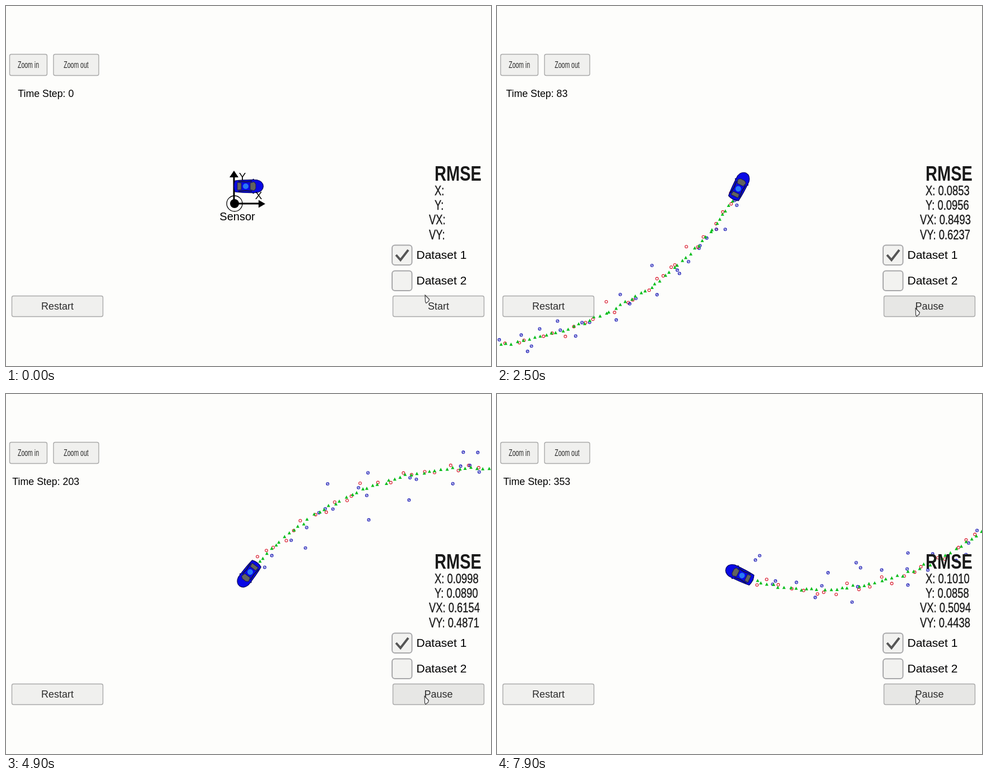
Write an HTML page with a canvas that moves like this. It is 868 px wide and 645 px high and loops after 8000 ms.

```html
<!DOCTYPE html>
<html lang="en">
<head>
<meta charset="utf-8">
<title>Sensor fusion tracker</title>
<style>
html, body { margin: 0; width: 100%; height: 100%; overflow: hidden; background: #fdfdfb; }
canvas { display: block; }
</style>
</head>
<body>
<canvas id="view" width="868" height="645"></canvas>
<script>
const ctx = document.getElementById('view').getContext('2d');
const LOOP = 8000, FRAME = 100, LAST = 353;
const FACE = '"Liberation Sans", Arial, sans-serif';
const CAR = { x: 434, y: 323 };

// Car position relative to the sensor every 25 steps, from step -25
const GAP = 25;
const PATH = [
  [-240, -39], [25, -31], [295, -39], [547, -107], [746, -267], [831, -494],
  [760, -725], [555, -868], [298, -854], [75, -712], [-47, -484], [-133, -244],
  [-233, 14], [-361, 232], [-585, 376], [-837, 384], [-1070, 226]
];

// Error readings shown at a few steps, in X, Y, VX, VY
const RMSE = [
  { step: 0, values: [.2878, .0197, 5.2, 1.2] },
  { step: 43, values: [.0998, .0886, 1.1499, .7144] },
  { step: 83, values: [.0853, .0956, .8493, .6237] },
  { step: 153, values: [.0882, .0969, .6729, .5344] },
  { step: 203, values: [.0998, .0890, .6154, .4871] },
  { step: 263, values: [.0991, .0846, .5598, .4365] },
  { step: LAST, values: [.1010, .0858, .5094, .4438] }
];

// Catmull-Rom spline
function along(s, k) {
  const i = Math.floor(s / GAP) + 1, u = s / GAP + 1 - i;
  const [a, b, c, d] = [-1, 0, 1, 2].map(n => PATH[Math.min(i + n, PATH.length - 1)][k]);
  return b + u * (c - a + u * (2 * a - 5 * b + 4 * c - d + u * (3 * (b - c) + d - a))) / 2;
}

const place = s => ({ x: along(s, 0), y: along(s, 1) });

function heading(s) {
  const a = place(Math.max(0, s - .5)), b = place(s + .5);
  return Math.atan2(b.y - a.y, b.x - a.x);
}

// The sum of squared errors grows evenly between readings
function reading(s, k) {
  const i = Math.max(1, RMSE.findIndex(r => r.step >= s));
  const a = RMSE[i - 1], b = RMSE[i];
  const sum = r => r.values[k] ** 2 * (r.step + 1);
  const u = (s - a.step) / (b.step - a.step);
  return Math.sqrt((sum(a) + (sum(b) - sum(a)) * u) / (s + 1)).toFixed(4);
}

let seed = 20177;
function random() {
  seed = (seed * 1664525 + 1013904223) % 4294967296;
  return (seed + 1) / 4294967297;
}
function gauss(sd) {
  return sd * Math.sqrt(-2 * Math.log(random())) * Math.cos(2 * Math.PI * random());
}

// Even steps are lidar, odd steps are radar with range and bearing noise
function measure(p, lidar) {
  if (lidar) return { x: p.x + gauss(6), y: p.y + gauss(6) };
  const r = Math.hypot(p.x, p.y) + gauss(12), a = Math.atan2(p.y, p.x) + gauss(.028);
  return { x: r * Math.cos(a), y: r * Math.sin(a) };
}

const marks = [];
for (let s = 0; s <= LAST; s++) {
  const p = place(s), lidar = s % 2 === 0;
  const est = { x: p.x + gauss(1.5), y: p.y + gauss(1.5) };
  marks.push({ est, lidar, seen: measure(p, lidar) });
}
marks[0].est = marks[0].seen = { x: 12, y: -31 };

function paint(fill, stroke, width = 1) {
  if (fill) { ctx.fillStyle = fill; ctx.fill(); }
  if (stroke) { ctx.strokeStyle = stroke; ctx.lineWidth = width; ctx.stroke(); }
}

function trace(points) {
  ctx.beginPath();
  points.forEach(([x, y]) => ctx.lineTo(x, y));
}

function poly(points, fill, stroke, width) {
  trace(points);
  ctx.closePath();
  paint(fill, stroke, width);
}

function line(points, color, width) {
  trace(points);
  paint(null, color, width);
}

function disc(x, y, r, fill, stroke, width) {
  ctx.beginPath();
  ctx.arc(x, y, r, 0, 2 * Math.PI);
  paint(fill, stroke, width);
}

function box(x, y, w, h, r, fill, stroke, width) {
  ctx.beginPath();
  ctx.roundRect(x, y, w, h, r);
  paint(fill, stroke, width);
}

function text(str, x, y, size, { align = 'left', color = '#000', narrow = 1, weight = 'normal', edge = 0 } = {}) {
  ctx.save();
  ctx.translate(x, y);
  ctx.scale(narrow, 1);
  ctx.font = `${weight} ${size}px ${FACE}`;
  ctx.textAlign = align;
  ctx.fillStyle = ctx.strokeStyle = color;
  ctx.fillText(str, 0, 0);
  if (edge) {
    ctx.lineWidth = edge;
    ctx.strokeText(str, 0, 0);
  }
  ctx.restore();
}

function button(x, y, w, h, label, size, narrow = 1, fill = '#f0f0ee') {
  box(x + .5, y + .5, w - 1, h - 1, 3, fill, '#a9a9a9', 1.4);
  text(label, x + w / 2, y + h / 2 + size * .34, size, { align: 'center', color: '#2c2c2c', narrow });
}

function drawMarks(step) {
  const shown = marks.slice(0, step + 1);
  for (const { seen: { x, y }, lidar } of shown) {
    disc(x, y, 2.4, null, lidar ? '#d81428' : '#1414b4', 1.1);
    if (!lidar) line([[x - 1.5, y + 1], [x + 1.5, y - 1]], '#1414b4', 1);
  }
  for (const { est: { x, y } } of shown) {
    poly([[x, y - 3], [x + 3, y + 2.7], [x - 3, y + 2.7]], '#0abe1e');
  }
}

function drawAxes() {
  line([[-1, 0], [-1, -49]], '#000', 3);
  line([[0, 0], [46, 0]], '#000', 3);
  poly([[-1, -59], [7, -47], [-9, -47]], '#000');
  poly([[55, .5], [43, -6.5], [43, 7.5]], '#000');
  disc(0, 0, 14, null, '#000', 1.3);
  disc(0, 0, 8, '#000');
}

function drawAxisLabels() {
  text('Y', 14, -42, 19, { align: 'center' });
  text('X', 43, -8, 19, { align: 'center' });
  text('Sensor', 5, 30, 20, { align: 'center' });
}

function drawCar(angle) {
  ctx.save();
  ctx.translate(CAR.x, CAR.y);
  ctx.rotate(angle);
  for (const side of [-1, 1]) {
    poly([[6, side * 10], [8, side * 13.5], [10, side * 13], [10, side * 10]], '#0a0a78');
  }
  ctx.beginPath();
  ctx.moveTo(-24, -10);
  ctx.quadraticCurveTo(-8, -12, 15, -11.5);
  ctx.quadraticCurveTo(26, -9, 26.5, 0);
  ctx.quadraticCurveTo(26, 9, 15, 11.5);
  ctx.quadraticCurveTo(-8, 12, -24, 10);
  ctx.quadraticCurveTo(-28, 0, -24, -10);
  paint('#0808e6', '#08085a', 1.2);
  poly([[3, -6], [10, -8], [13, -4], [13, 4], [10, 8], [3, 6]], '#62645f', '#20204a');
  poly([[-20, -7], [-13, -6], [-13, 6], [-20, 7]], '#62645f', '#20204a');
  for (const side of [-1, 1]) {
    line([[-18, side * 9], [-5, side * 7.8], [6, side * 9]], '#14143c', 1.8);
  }
  disc(-5, 0, 5, '#2878f5');
  ctx.restore();
}

function drawPanel(step) {
  const dark = { color: '#1a1a1a', narrow: .8 };
  text('RMSE', 767, 313, 37, { ...dark, narrow: .785, weight: 'bold' });
  ['X', 'Y', 'VX', 'VY'].forEach((name, i) => {
    const value = step ? reading(step, i) : '';
    text(`${name}: ${value}`, i < 2 ? 767 : 757, 339 + i * 26.2, 23, { ...dark, edge: .35 });
  });
  for (const i of [0, 1]) {
    const y = 428 + i * 46;
    box(691, y + .5, 35.5, 35.5, 5, '#f2f2f0', '#a8a8aa', 2);
    text(`Dataset ${i + 1}`, 734.5, y + 25, 21);
  }
  line([[698, 446], [706, 455], [720, 437]], '#555', 4);
}

function drawCursor(x, y) {
  poly([[x, y], [x + 7.5, y + 7.5], [x + 6.5, y + 11], [x + 2, y + 14.5], [x + .5, y + 12]],
    '#f4f4f4', '#333', 1.1);
}

function draw(t) {
  const step = t < 900 ? 0 : Math.min(LAST, Math.round((t - 840) / 20));
  const p = place(step);
  const inWorld = paintWorld => {
    ctx.save();
    ctx.translate(CAR.x - p.x, CAR.y - p.y);
    paintWorld();
    ctx.restore();
  };

  ctx.fillStyle = '#fdfdfb';
  ctx.fillRect(0, 0, 868, 645);

  inWorld(() => {
    drawAxes();
    if (step) drawMarks(step);
  });
  drawCar(heading(step));
  inWorld(drawAxisLabels);

  button(6, 86, 68, 39, 'Zoom in', 16, .66);
  button(84.5, 86, 82, 39, 'Zoom out', 16, .66);
  button(10, 519, 164, 38, 'Restart', 18);
  button(692, 519, 164, 38, step ? 'Pause' : 'Start', 18, 1, t ? '#e7e7e5' : '#f0f0ee');
  text(`Time Step: ${step}`, 71.3, 163, 17.8, { align: 'center' });
  drawPanel(step);

  const glide = Math.min(1, t / 500);
  drawCursor(750 - glide, 518 + 23.5 * glide);
}

function tick() {
  const t = performance.now() % LOOP;
  draw(Math.floor(t / FRAME) * FRAME);
  requestAnimationFrame(tick);
}
tick();
</script>
</body>
</html>
```
